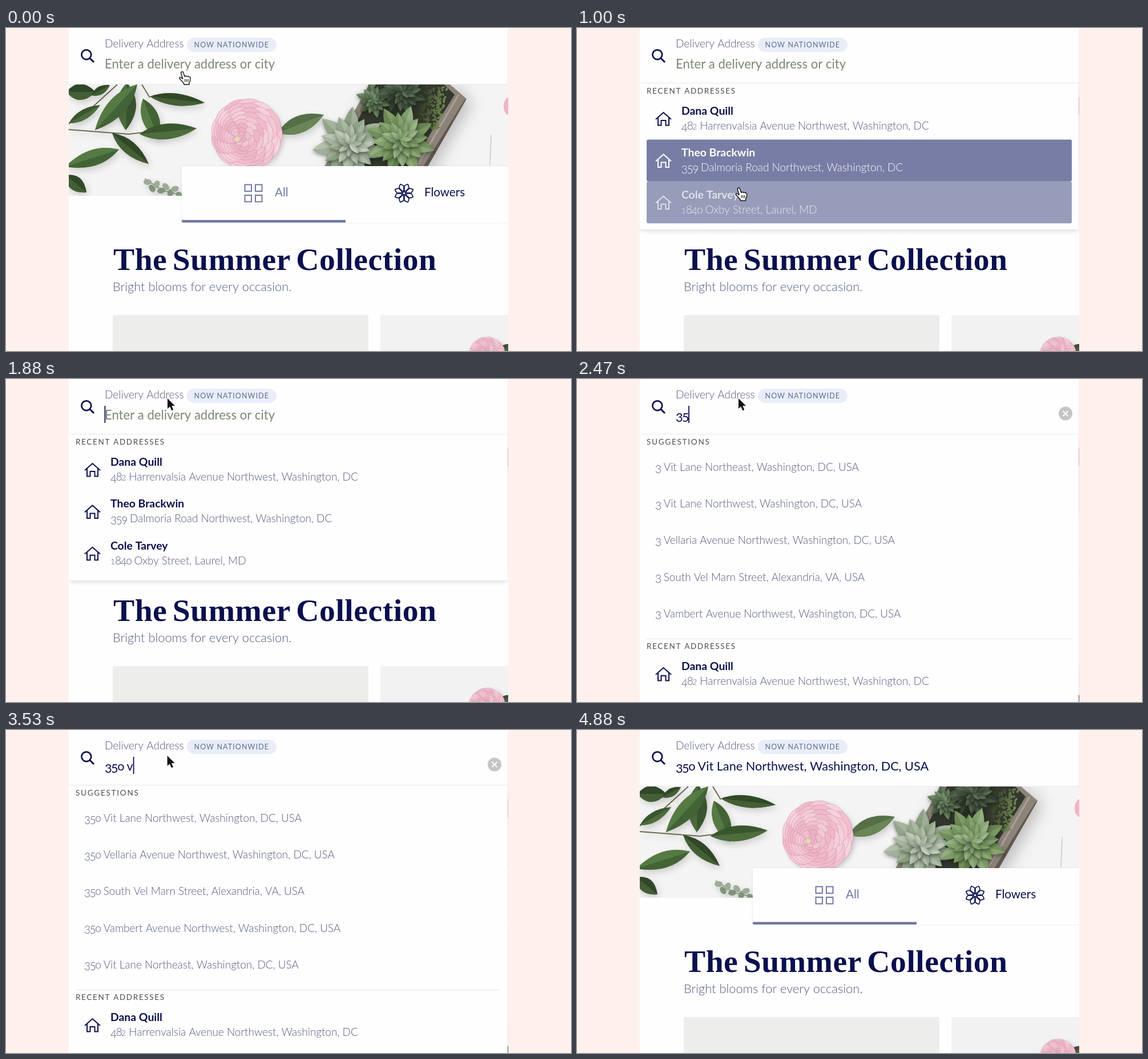
Animation of 990x566 px, one loop 4.94 s. Source, as an HTML page with a canvas:

```html
<!DOCTYPE html>
<html lang="en">
<head>
<meta charset="utf-8">
<title>Delivery address search</title>
<style>
html, body { margin: 0; width: 990px; height: 566px; overflow: hidden; background: #fef1ed; }
canvas { display: block; }
</style>
</head>
<body>
<canvas id="stage" width="990" height="566"></canvas>
<script>
const LOOP = 4940, W = 990, H = 566;
const NAVY = [10, 15, 78], GREY = [82, 90, 126], WHITE = [255, 255, 255];
const view = document.getElementById('stage').getContext('2d');
let c = view;

const recents = [
  ['Dana Quill', '482 Harrenvalsia Avenue Northwest, Washington, DC'],
  ['Theo Brackwin', '359 Dalmoria Road Northwest, Washington, DC'],
  ['Cole Tarvey', '1840 Oxby Street, Laurel, MD']
];
const streets = [
  'Vit Lane Northwest, Washington, DC, USA',
  'Vellaria Avenue Northwest, Washington, DC, USA',
  'South Vel Marn Street, Alexandria, VA, USA',
  'Vambert Avenue Northwest, Washington, DC, USA',
  'Vit Lane Northeast, Washington, DC, USA'
];
// Hover windows [start, end] of each recent row
const hovers = [[[660, 820], [1400, 1490]], [[820, 940], [1280, 1400]], [[940, 1280]]];
// Pointer path: time, x, y
const path = [
  [0, 309, 77], [610, 309, 77], [700, 300, 135], [820, 288, 204], [950, 284, 268],
  [1080, 283, 300], [1180, 283, 297], [1290, 283, 244], [1400, 284, 180],
  [1500, 284, 110], [1590, 283, 55], [1660, 283, 34], [3500, 283, 34],
  [3590, 282, 66], [3690, 281, 130], [3780, 280, 151], [LOOP, 280, 151]
];
const PICK = 3820;

const clamp = v => Math.max(0, Math.min(1, v));
const rgb = a => `rgb(${a.map(Math.round)})`;
const mix = (a, b, k) => rgb(a.map((v, i) => v + (b[i] - v) * k));
const fade = (t, [on, off]) => Math.min(clamp((t - on) / 140), clamp(1 - (t - off) / 140));

// Draws text with old-style figures and returns the end x
function text(s, x, y, size, color, weight = 400, spacing = 0) {
  c.fillStyle = color;
  c.letterSpacing = spacing + 'px';
  for (const part of s.split(/(\d)/)) {
    if (!part) continue;
    const digit = /\d/.test(part), small = /[12]/.test(part);
    const glyph = part === '0' ? 'o' : part;
    const px = small ? size * 0.72 : size;
    const drop = /[34579]/.test(part) && digit ? size * 0.19 : 0;
    c.font = `${weight} ${px}px Lato, sans-serif`;
    c.fillText(glyph, x, y + drop);
    x += c.measureText(glyph).width * (digit && !small ? 0.88 : 1);
  }
  c.letterSpacing = '0px';
  return x;
}

function line(pts, color, width) {
  c.beginPath();
  pts.forEach(([x, y]) => c.lineTo(x, y));
  c.strokeStyle = color;
  c.lineWidth = width;
  c.stroke();
}

function poly(pts, color) {
  c.beginPath();
  pts.forEach(([x, y]) => c.lineTo(x, y));
  c.fillStyle = color;
  c.fill();
}

function box(x, y, w, h, r, color) {
  c.beginPath();
  c.roundRect(x, y, w, h, r);
  c.fillStyle = color;
  c.fill();
}

function oval(x, y, rx, ry, color, turn = 0) {
  c.beginPath();
  c.ellipse(x, y, rx, ry, turn, 0, 7);
  c.fillStyle = color;
  c.fill();
}

function shadow(color, blur = 0, dx = 0, dy = 0) {
  c.shadowColor = color;
  c.shadowBlur = blur;
  c.shadowOffsetX = dx;
  c.shadowOffsetY = dy;
}
const noShadow = () => shadow('transparent');

// Pointed leaf; left and right set the bulge of each side
function leafPath(x1, y1, x2, y2, left, right = left) {
  const d = Math.hypot(x2 - x1, y2 - y1), nx = (y1 - y2) / d, ny = (x2 - x1) / d;
  const mx = x1 + (x2 - x1) * 0.45, my = y1 + (y2 - y1) * 0.45;
  c.beginPath();
  c.moveTo(x1, y1);
  c.quadraticCurveTo(mx + nx * left, my + ny * left, x2, y2);
  c.quadraticCurveTo(mx - nx * right, my - ny * right, x1, y1);
}

function leaf(x1, y1, x2, y2, w, hue, sat, light) {
  leafPath(x1, y1, x2, y2, w);
  c.fillStyle = `hsl(${hue},${sat}%,${light}%)`;
  c.fill();
  c.save();
  noShadow();
  leafPath(x1, y1, x2, y2, w, 0);
  c.fillStyle = `hsl(${hue - 5},${sat}%,${light + 7}%)`;
  c.fill();
  c.restore();
}

function rosette(x, y, r, n, hue, sat, light) {
  shadow('rgba(20,28,18,.5)', 7, 1, 3);
  for (let ring = 0; ring < 4; ring++) {
    const size = r * (1 - ring * 0.22);
    for (let i = 0; i < n; i++) {
      const a = (i + ring * 0.5) / n * Math.PI * 2 + 0.3;
      leaf(x, y, x + Math.cos(a) * size, y + Math.sin(a) * size, size * 0.4,
        hue, sat, light - 4 + ring * 2 + Math.sin(i * 2.4) * 6);
    }
  }
  noShadow();
}

// Layered round bloom whose heart sits at offset (dx, dy)
function bloom(x, y, r, dx, dy) {
  shadow('rgba(90,70,80,.3)', 10, 4, 4);
  oval(x, y, r * 0.96, r * 0.94, '#eebdca');
  noShadow();
  for (let ring = 0; ring < 10; ring++) {
    const k = ring / 10, rad = r * (1 - k), n = 13 - ring;
    for (let i = 0; i < n; i++) {
      const a = (i + ring * 0.4) / n * Math.PI * 2;
      const px = x + dx * k + Math.cos(a) * rad * 0.72, py = y + dy * k + Math.sin(a) * rad * 0.72;
      oval(px, py, rad * 0.27, rad * 0.38, `hsl(342,${64 - ring}%,${87 - ring * 0.5 + Math.sin(i * 1.9 + ring) * 3}%)`, a);
      c.strokeStyle = 'rgba(198,112,142,.45)';
      c.lineWidth = 0.9;
      c.stroke();
    }
  }
  oval(x + dx, y + dy, r * 0.07, r * 0.07, '#e2deb0');
}

function foliage() {
  shadow('rgba(60,65,60,.22)', 12, 3, 5);
  line([[110, 178], [215, 186], [300, 176]], '#6d6a50', 2);
  line([[110, 168], [150, 140], [195, 99]], '#6d6a50', 2);
  line([[238, 99], [252, 122]], '#6d6a50', 2);
  [[106, 112, 157, 112, 28, 0], [150, 118, 182, 100, 14, 0], [110, 167, 165, 135, 17, 1],
   [212, 96, 210, 179, 34, 1], [230, 99, 156, 179, 31, 2], [252, 120, 348, 131, 21, 0],
   [240, 124, 268, 196, 29, 2], [234, 186, 334, 176, 27, 1], [186, 184, 250, 238, 23, 0],
   [198, 213, 104, 243, 28, 2], [104, 258, 141, 288, 24, 0]
  ].forEach(([x1, y1, x2, y2, w, k]) => leaf(x1, y1, x2, y2, w, 104, 29, 22 + k * 4));
  line([[243, 264], [275, 285], [306, 292]], '#8a9585', 1.5);
  for (let i = 0; i < 8; i++)
    oval(248 + i * 8, 270 + i * 2 + (i % 2) * 9, 7, 5, i % 2 ? '#84957f' : '#9dab96', i);
  leaf(476, 184, 557, 152, 30, 100, 22, 36);
  noShadow();
}

function planter() {
  shadow('rgba(50,48,45,.3)', 28, 8, 6);
  poly([[636, 99], [778, 99], [807, 124], [737, 246], [556, 246]], '#8c8479');
  noShadow();
  poly([[648, 99], [768, 99], [786, 117], [706, 246], [574, 246]], '#33382e');
  poly([[803, 127], [807, 124], [737, 246], [729, 246]], '#5f574e');
  line([[793, 117], [718, 246]], '#aaa297', 3);
  for (let i = 0; i < 200; i++) {
    const u = Math.abs(Math.sin(i * 12.99) * 437.5) % 1, v = Math.abs(Math.sin(i * 78.2) * 437.5) % 1;
    oval(730 + u * 44 - v * 14, 102 + v * 76, 2.4, 1.6, `hsl(85,25%,${18 + u * 26}%)`, i);
  }
  rosette(644, 126, 32, 6, 105, 15, 40);
  rosette(694, 112, 44, 7, 110, 12, 27);
  rosette(602, 204, 66, 7, 102, 13, 64);
  rosette(691, 196, 62, 8, 97, 22, 51);
}

function photo() {
  c.save();
  c.beginPath();
  c.rect(110, 99, 770, 195);
  c.clip();
  box(110, 99, 770, 195, 0, '#f5f4f4');
  foliage();
  bloom(422, 186, 63, -17, 9);
  planter();
  oval(882, 137, 10, 16, '#efb5c5');
  line([[850, 187], [848, 240]], '#c9c8c6', 1.5);
  c.restore();
}

function tabs() {
  shadow('rgba(30,35,80,.15)', 3);
  box(308, 242, 590, 99, 2, '#fefefe');
  noShadow();
  box(308, 336.6, 287, 4.2, [0, 0, 0, 2], '#6a73a0');
  c.strokeStyle = '#6a73a0';
  c.lineWidth = 1.9;
  for (const x of [418.5, 437]) for (const y of [274.5, 293]) c.strokeRect(x, y, 11.5, 11.5);
  text('All', 471, 295, 20.6, '#6f78a2');
  c.strokeStyle = rgb(NAVY);
  c.lineWidth = 1.7;
  for (let i = 0; i < 8; i++) {
    const a = (i + 0.5) * Math.PI / 4, cos = Math.cos(a), sin = Math.sin(a);
    leafPath(697.5 + cos * 4, 289.5 + sin * 4, 697.5 + cos * 17, 289.5 + sin * 17, 9);
    c.stroke();
  }
  c.beginPath();
  c.arc(697.5, 289.5, 2.6, 0, 7);
  c.stroke();
  text('Flowers', 733, 295, 20.6, rgb(NAVY));
}

function page() {
  box(0, 0, W, H, 0, '#fef1ed');
  c.save();
  c.beginPath();
  c.rect(110, 0, 770, H);
  c.clip();
  box(110, 0, 770, H, 0, '#fefefe');
  photo();
  tabs();
  c.font = 'bold 55.7px "Liberation Serif", serif';
  c.letterSpacing = '.5px';
  c.wordSpacing = '-5px';
  c.fillStyle = rgb(NAVY);
  c.fillText('The Summer Collection', 188, 424);
  c.wordSpacing = '0px';
  text('Bright blooms for every occasion.', 187, 461, 21.8, rgb(GREY), 300);
  box(187, 503, 448, 80, 3, '#ededec');
  box(656, 503, 240, 80, 3, '#f2f2f2');
  leaf(862, 572, 886, 554, 16, 95, 18, 26);
  bloom(843, 574, 33, -3, -5);
  c.restore();
}

function header() {
  box(110, 0, 770, 98, 0, '#fefefe');
  line([[110, 98.5], [880, 98.5]], '#e9e9ee', 1);
  line([[879.5, 4], [879.5, 98]], '#eeeef1', 1);
  c.beginPath();
  c.arc(140.8, 46.7, 8.4, 0, 7);
  c.strokeStyle = rgb(NAVY);
  c.lineWidth = 2.7;
  c.stroke();
  line([[147, 53], [154, 60]], rgb(NAVY), 3);
  text('Delivery Address', 173, 34, 19, rgb(GREY), 300);
  box(317, 17, 157, 25, 12.5, '#e8edf7');
  text('NOW NATIONWIDE', 329.5, 34, 12.5, '#626e97', 400, 1.1);
}

function queryAt(t) {
  if (t < 2240) return '';
  if (t < 2470) return '3';
  if (t < 2590) return '35';
  return t < 2880 ? '350' : '350 v';
}

function caretOn(t) {
  return t >= 60 && t < PICK && !(t >= 650 && t < 1120) && !(t >= 1710 && t < 1860) && !(t >= 3240 && t < 3530);
}

function field(t) {
  const query = queryAt(t);
  let end = 172.5;
  if (t >= PICK) text('350 ' + streets[0], 173, 71, 21.7, rgb(NAVY));
  else if (query) end = text(query, 173, 71, 21.7, rgb(NAVY));
  else text('Enter a delivery address or city', 173, 71, 22.1, '#7c8775');
  if (query && t < PICK) {
    oval(856, 60.5, 12, 12, '#c5c5c7');
    line([[851.5, 56], [860.5, 65]], '#fff', 2);
    line([[860.5, 56], [851.5, 65]], '#fff', 2);
  }
  if (caretOn(t)) box(end, 47, 1.8, 30, 0, rgb(NAVY));
}

function highlight(y, h, a) {
  if (a > 0) box(122, y, 745, h, 3, `rgba(16,28,98,${a})`);
}

function house(x, y, color) {
  c.lineJoin = 'miter';
  line([[x - 13.5, y + 1], [x, y - 11], [x + 13.5, y + 1]], color, 2);
  line([[x - 9.5, y - 2], [x - 9.5, y + 11.5], [x - 4, y + 11.5], [x - 4, y + 3], [x + 4, y + 3],
    [x + 4, y + 11.5], [x + 9.5, y + 11.5], [x + 9.5, y - 2]], color, 2);
}

function recentList(t, top) {
  text('RECENT ADDRESSES', 122, top + 17, 13.5, '#4d4d52', 400, 1.65);
  recents.forEach(([name, address], i) => {
    const y = top + 24 + i * 73.4;
    const a = Math.max(...hovers[i].map(h => fade(t, h)));
    const ink = clamp(a * 2);
    highlight(y, 73.4, a);
    house(151.5, y + 37, mix(NAVY, WHITE, ink));
    text(name, 183, y + 30, 19.4, mix(NAVY, WHITE, ink), 700);
    text(address, 183, y + 56, 18.9, mix(GREY, WHITE, ink), 300);
  });
}

function dropdown(t) {
  const alpha = Math.min(clamp((t - 20) / 250), clamp((4000 - t) / (4000 - PICK)));
  if (!alpha) return;
  const query = queryAt(t - 50);
  c.save();
  c.beginPath();
  c.rect(110, 94, 770, H);
  c.clip();
  c.globalAlpha = alpha;
  shadow('rgba(25,30,70,.17)', 8, 0, 2);
  box(110, 98, 769, query ? 610 : 255, [0, 0, 3, 3], '#fefefe');
  noShadow();
  if (query) {
    text('SUGGESTIONS', 122, 115, 13.5, '#4d4d52', 400, 1.75);
    streets.forEach((_, i) => {
      const a = i ? 0 : fade(t, [3630, 4100]);
      const y = 161 + i * 64.2;
      highlight(y - 39, 64.2, a);
      const street = streets[(i + 5 - query.length) % 5];
      text(query.slice(0, 3) + ' ' + street, 137, y, 18.9, mix(GREY, WHITE, clamp(a * 2)), 300);
    });
    line([[122, 455.5], [867, 455.5]], '#e1e3e8', 1);
    recentList(t, 456);
  } else recentList(t, 98);
  c.restore();
}

const hand = new Path2D('M-2.5 2Q-2-.7 0-.5Q1.5-.3 2.2 2.5L4 8Q6 6 8 8Q10 6.5 11.5 8.7Q14 8 14 11L13.5 16L12 18.5V22H3L2.5 20L-1 16L-5 11.5Q-5.5 8.7-3 9.5L.6 12Z');
const arrow = new Path2D('M0 0V18L4.2 14.2L7.2 21.2L10.3 19.9L7.3 13.1H13Z');

function pointer(t) {
  const i = Math.max(1, path.findIndex(p => p[0] > t));
  const [t0, x0, y0] = path[i - 1], [t1, x1, y1] = path[i];
  const k = (t - t0) / (t1 - t0), y = y0 + (y1 - y0) * k;
  c.save();
  c.globalAlpha = clamp((4870 - t) / 210);
  c.translate(x0 + (x1 - x0) * k, y);
  c.lineJoin = 'round';
  if (y > 46) {
    c.fillStyle = '#fff';
    c.fill(hand);
    c.strokeStyle = '#111';
    c.lineWidth = 1.4;
    c.stroke(hand);
    for (const x of [4.5, 7.2, 9.9]) line([[x, 12.5], [x + 0.3, 17.5]], '#111', 1.1);
  } else {
    c.strokeStyle = '#fff';
    c.lineWidth = 2.4;
    c.stroke(arrow);
    c.fillStyle = '#111';
    c.fill(arrow);
  }
  c.restore();
}

const still = document.createElement('canvas');
still.width = W;
still.height = H;
c = still.getContext('2d');
page();
header();
c = view;

const start = performance.now();
function frame(now) {
  const t = Math.max(0, now - start) % LOOP;
  c.drawImage(still, 0, 0);
  dropdown(t);
  field(t);
  pointer(t);
  requestAnimationFrame(frame);
}
frame(start);
</script>
</body>
</html>
```
